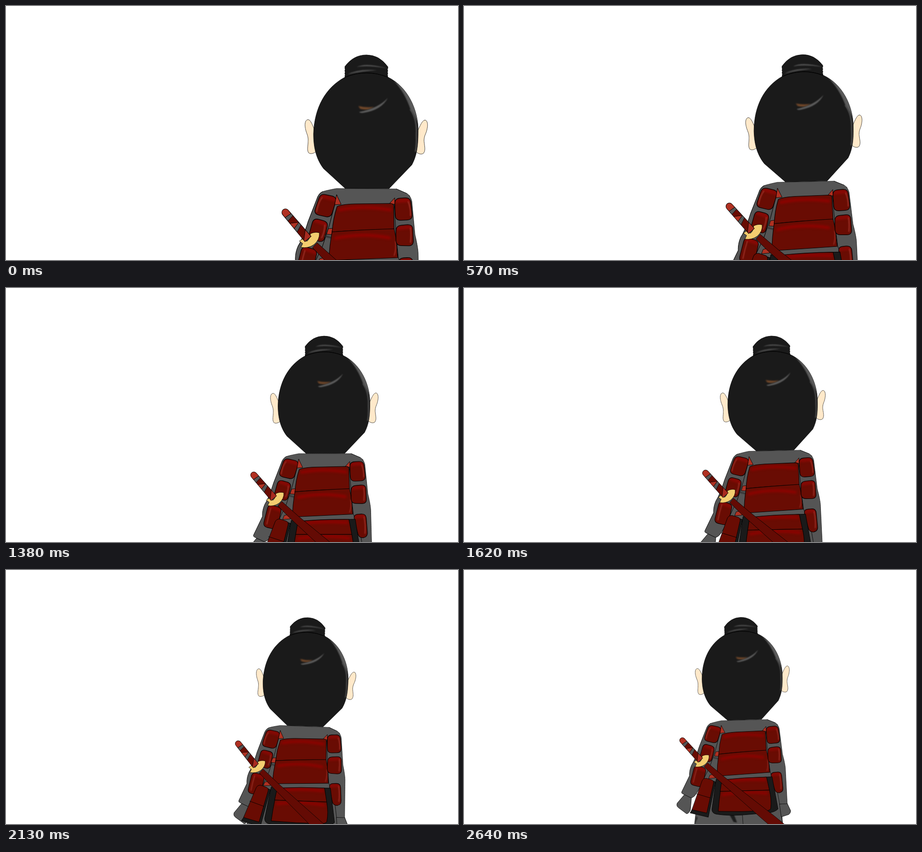
These frames come from a looping animation (998 px wide and 561 px high, 3.48 s). An HTML page with a canvas:

```html
<!DOCTYPE html>
<html lang="en">
<head>
<meta charset="utf-8">
<title>Walking warrior</title>
<style>
html, body { margin: 0; width: 100%; height: 100%; overflow: hidden; background: #fff; }
canvas { display: block; }
</style>
</head>
<body>
<canvas id="stage" width="998" height="561"></canvas>
<script>
const ctx = document.getElementById('stage').getContext('2d');
const LOOP = 3480, WALK = 2640, STEP = 30;
const PIVOT = { x: 797, y: 552.6 }, SHOULDER = { x: 708, y: 425 };
const HAIR = '#1a1a1a', GREY = '#555', RED = '#690c03', BRIGHT = '#b03122',
      SKIN = '#ffe9ca', GOLD = '#f3cd70', INK = '#000';

function shape(d, fill, line = 1.1, dash = []) {
  const path = new Path2D(d);
  if (fill) { ctx.fillStyle = fill; ctx.fill(path); }
  if (line) {
    ctx.strokeStyle = INK;
    ctx.lineWidth = line;
    ctx.setLineDash(dash);
    ctx.stroke(path);
    ctx.setLineDash([]);
  }
}

// Soft light, optionally kept inside another shape.
function glow(d, color, width, blur, inside) {
  ctx.save();
  if (inside) ctx.clip(new Path2D(inside));
  ctx.filter = `blur(${blur}px)`;
  const path = new Path2D(d);
  if (width) {
    ctx.strokeStyle = color;
    ctx.lineWidth = width;
    ctx.stroke(path);
  } else {
    ctx.fillStyle = color;
    ctx.fill(path);
  }
  ctx.restore();
}

// Closed polygon with rounded corners, as path data.
function rounded(points, r) {
  const n = points.length;
  const toward = ([ax, ay], [bx, by]) => {
    const k = r / Math.hypot(bx - ax, by - ay);
    return `${ax + (bx - ax) * k} ${ay + (by - ay) * k}`;
  };
  return points.map((p, i) => {
    const before = points[(i + n - 1) % n], after = points[(i + 1) % n];
    return `${i ? 'L' : 'M'}${toward(p, before)}Q${p[0]} ${p[1]} ${toward(p, after)}`;
  }).join('') + 'Z';
}

function pad(corners, shine) {
  const d = rounded(corners, 12);
  shape(d, RED, 0);
  const [[ax, ay], [bx, by]] = corners;
  glow(`M${ax + 4} ${ay + 6}L${bx - 3} ${by + 6}`, '#8d0805', 7, 2.5, d);
  glow(shine, 'rgba(190,70,60,.75)', 2, 1, d);
  shape(d, null, 1.3);
}

function plate(d, light) {
  shape(d, RED, 0);
  glow(light, '#8f0200', 7, 2.5, d);
  shape(d, null, 1.2);
}

function drawHead() {
  shape('M667 251C661 251 659 260 661 270C663 282 668 286 667 299C667 310 664 317 668 324C672 328 680 326 686 320L686 285C679 270 674 251 667 251Z', SKIN, 0.8, [2, 1]);
  shape('M925 252C930 252 932 261 930 270C928 283 923 285 923 298C924 310 927 318 922 325C918 329 909 327 904 320L904 285C912 272 917 253 925 252Z', SKIN, 0.8, [2, 1]);

  let bun = 'M748 134Q767 108 796 108Q824 108 843 134';
  for (let y = 134; y < 156; y += 6) bun += `Q844 ${y + 3} 842 ${y + 6}`;
  bun += 'L749 158';
  for (let y = 158; y > 136; y -= 6) bun += `Q747 ${y - 3} 749 ${y - 6}`;
  shape(bun + 'Z', HAIR, 0.8);

  const head = 'M749 403L701 359C682 334 679 305 679 282C681 225 705 180 749 157Q796 139 843 157C888 179 910 230 910 275C910 310 907 330 896 351L846 403Z';
  shape(head, HAIR, 0.8);
  glow('M856 165Q905 193 911 262Q903 243 893 228Q880 190 856 165Z', '#5a5a5a', 0, 1, head);
  glow('M893 229Q908 250 906 285Q907 308 904 321', '#555', 2.5, 1.2, head);

  glow('M774 135Q794 124 843 138Q797 130 774 135Z', '#555', 0, 0.8);
  glow('M754 151Q778 138 819 142Q785 144 754 151Z', '#505050', 0, 0.8);
  shape('M748 158Q796 137 844 158', null, 1.2);
  glow('M778 221Q794 225 813 223Q799 232 782 227Z', '#74492a', 0, 1.5);
  glow('M780 234Q822 226 843 203Q829 230 789 236Q781 237 780 234Z', '#5c5c5c', 0, 0.8);
}

// The left arm swings at the shoulder against the rocking of the body.
function drawLeftArm(angle) {
  ctx.save();
  ctx.translate(SHOULDER.x, SHOULDER.y);
  ctx.rotate(angle);
  ctx.translate(-SHOULDER.x, -SHOULDER.y);
  shape('M624 616L604 640Q601 648 608 653L631 670Q636 671 642 660L645 625Z', GREY);
  shape('M730 406Q708 406 699 410Q690 414 686 427L667 476Q655 515 645 530Q638 546 639 561L617 607Q616 611 620 613L643 624Q653 626 666 600L699 530L714 484L731 418Z', GREY, 0);
  shape('M731 418L714 484L699 530L666 600Q653 626 643 624L620 613Q615 611 617 607L639 561Q638 546 645 530Q655 515 667 476L686 427Q690 414 699 410', null);
  pad([[694, 414], [731, 422], [717, 468], [679, 459]], 'M698 423Q689 435 686 454');
  pad([[679, 468], [712, 477], [701, 523], [667, 512]], 'M704 484Q703 500 697 512');
  pad([[654, 530], [688, 539], [675, 594], [640, 586]], 'M660 540Q654 560 650 580');
  ctx.restore();
}

function drawBody(armAngle) {
  // legs and torso
  shape('M650 655L640 725L898 725L893 640L866 560L700 560Z', GREY, 1);
  shape('M782 672L784 725M888 590Q892 640 896 700', null, 1);
  glow('M745 674L756 695L766 697L758 674ZM650 675L644 700L653 680Z', '#1c1c1c', 0, 1);
  shape('M699 410Q712 406 730 403L862 404L892 419L890 640L860 600L690 590L672 578L690 520L694 440Z', GREY, 0);

  drawLeftArm(armAngle);

  // right arm
  shape('M890 648L912 647L921 668Q921 675 915 679L894 685Z', GREY);
  shape('M862 404L885 414Q893 419 896 431L903 505Q909 530 910 545L912 648L890 648L878 590L863 535L857 428Z', GREY, 0);
  shape('M862 404L885 414Q893 419 896 431L903 505Q909 530 910 545L912 648L890 648', null, 0.9, [2, 1]);
  shape('M857 436L861 500L866 555L884 607L890 648', null, 1);
  shape('M699 410Q712 406 730 403L862 404L885 414', null, 0.7, [2, 1]);

  // cords
  shape('M730 417L740 438L726 439Z', BRIGHT, 1);
  shape('M858 424L846 437L858 438Z', BRIGHT, 1);
  shape('M712 492L721 491L719 505L708 504Z', BRIGHT, 1);
  glow('M704 508L719 512', '#2c2c2c', 3, 1.2);
  shape('M693 558L713 554L707 567L689 568Z', BRIGHT, 1);

  plate('M731 443Q740 438 770 437L850 436Q857 437 856 445L857 493Q785 494 720 499Q722 470 731 443Z',
        'M737 450Q788 440 848 450');
  plate('M720 499Q785 494 857 492L861 512L865 556L713 562Q714 530 720 499Z',
        'M728 513Q785 500 846 512');
  glow('M860 520Q862 538 857 551', 'rgba(190,70,60,.6)', 2, 1);

  pad([[858, 425], [893, 423], [898, 472], [860, 474]], 'M888 432Q894 448 893 463');
  pad([[861, 485], [898, 482], [900, 530], [861, 529]], 'M893 490Q895 506 893 522');
  pad([[866, 557], [898, 555], [902, 614], [880, 617], [873, 588]], 'M893 563Q897 584 895 605');
}

function drawSkirt() {
  shape('M710 571L695 657Q695 668 707 671Q738 677 780 676L862 672Q878 669 885 662L871 569L858 569L727 573Z', HAIR);
  plate('M727 573Q790 568 855 569L862 607L721 606Z', 'M733 579Q790 572 850 577');
  plate('M721 606L862 607Q868 635 864 660Q861 666 850 666Q780 667 713 663Q716 635 721 606Z',
        'M728 616Q790 606 854 616');

  // thigh guard
  shape('M697 574L708 578L684 679L632 665L639 654Z', HAIR);
  shape('M670 573Q674 566 682 567L697 572Q704 575 702 582L680 667L638 656Z', RED);
  shape('M653 611L692 624', null);
}

function drawSword() {
  shape('M687 523L728 560L874 682L915 718L870 718L834 685L703 561L677 534Z', '#640b04', 1);
  shape('M648 519L657 513L664 520Q672 514 672 503Q682 498 692 501Q693 516 680 527Q667 536 651 533L655 525Z', GOLD, 0.9);

  ctx.save();
  ctx.translate(617, 456);
  ctx.rotate(Math.atan2(60, 51));
  const grip = 'M0 -8L77 -9L77 9L0 8A8 8 0 0 1 0 -8Z';
  shape(grip, RED, 0);
  ctx.save();
  ctx.clip(new Path2D(grip));
  shape('M-9 -9L10 -9L8 9L-9 9Z', BRIGHT, 0.9);
  shape('M10 -9L8 9L18 9L16 -9Z', GREY, 0.9);
  shape('M24 9L36 -9L40 9Z', BRIGHT, 0.9);
  shape('M36 -9L43 -9L50 9L40 9Z', GREY, 0.9);
  shape('M77 -10L57 -9L74 10L77 10Z', '#a82b20', 0.9);
  ctx.restore();
  shape(grip, null, 1);
  ctx.restore();
}

// Rocking as a zigzag from -1 to 1, five half swings over the walk.
function sway(progress) {
  const k = progress * 5, i = Math.floor(k);
  if (i === 0) return -k;
  return (i % 2 ? -1 : 1) * (1 - 2 * (k - i));
}

function render(time) {
  const p = Math.min(time, WALK) / WALK;
  const scale = 1 - 0.2314 * p;
  const tilt = sway(p) * 1.9 * Math.PI / 180;
  ctx.setTransform(1, 0, 0, 1, 0, 0);
  ctx.fillStyle = '#fff';
  ctx.fillRect(0, 0, 998, 561);
  ctx.translate(PIVOT.x - 174 * p, PIVOT.y - 106.6 * p);
  ctx.rotate(tilt);
  ctx.scale(scale, scale);
  ctx.translate(-PIVOT.x, -PIVOT.y);
  ctx.lineJoin = ctx.lineCap = 'round';
  drawHead();
  drawBody(-1.15 * tilt);
  drawSkirt();
  drawSword();
}

const start = performance.now();
let shown = -1;
function tick() {
  const elapsed = Math.max(0, performance.now() - start) % LOOP;
  const time = Math.min(WALK, Math.floor(elapsed / STEP) * STEP);
  if (time !== shown) render(shown = time);
  requestAnimationFrame(tick);
}
tick();
</script>
</body>
</html>
```
